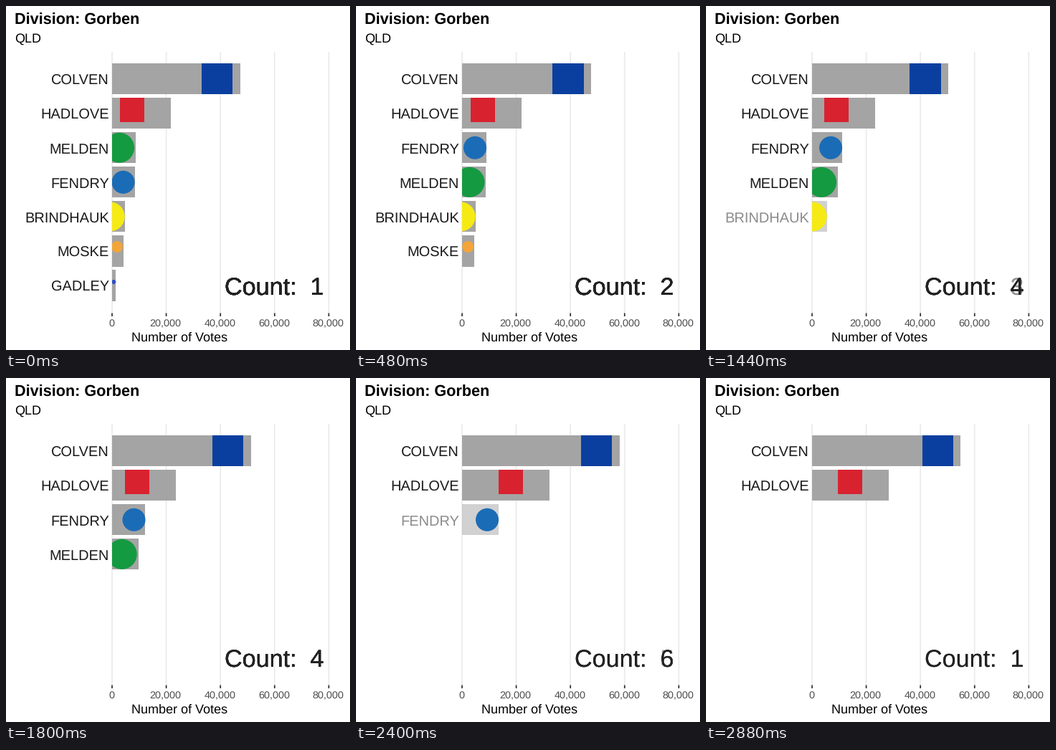
Write a matplotlib script that moves like this. It is 480 px wide and 480 px high and loops after 3 s.

```python
import matplotlib.pyplot as plt
from matplotlib.animation import FuncAnimation
from matplotlib.patches import Circle, Rectangle

plt.rcParams["font.family"] = "Liberation Sans"
plt.rcParams["text.hinting"] = "none"

SIZE = 480
FRAMES, INTERVAL = 25, 120
X0, X_STEP = 148, 75.6          # pixel of zero, pixels per 20,000 votes
ROW_TOP, ROW_STEP, BAR_H = 101.7, 48.05, 43.2
PANEL_TOP, PANEL_BOTTOM = 64, 428.5
GREY = "#a4a4a4"

# Start and end frame of the move out of each count; the last one wraps.
MOVES = [(2, 4), (6, 9), (11, 13), (15, 17), (19, 21), (23, 25)]

# name, rows (first count, later counts), votes per count,
# badge: shape, colour, centre offset from bar end and row, half size
CANDIDATES = [
    ("COLVEN", (0, 0), [47300, 47600, 49260, 51240, 53700, 62450],
     ("square", "#0b3f9f", -32, 0, 21.6)),
    ("HADLOVE", (1, 1), [21800, 22000, 23000, 23600, 29850, 34830],
     ("square", "#d9222f", -54, -4.6, 17)),
    ("MELDEN", (2, 3), [8750, 8850, 9350, 9720],
     ("circle", "#149a40", -23, 0, 21)),
    ("FENDRY", (3, 2), [8350, 9000, 9950, 12300, 13500],
     ("circle", "#1b6cb6", -16, 0, 16)),
    ("BRINDHAUK", (4, 4), [4800, 5050, 5600],
     ("circle", "#f6ea14", -21, 0, 20.5)),
    ("MOSKE", (5, 5), [4200, 4550],
     ("circle", "#f2a53a", -9, -6, 8)),
    ("GADLEY", (6, 6), [1400],
     ("circle", "#2c50c4", -3, -5, 3)),
]


def ease(t):
    """Cubic in and out."""
    return 4 * t ** 3 if t < 0.5 else 1 - 4 * (1 - t) ** 3


def mix(a, b, t):
    return a + (b - a) * t


def phase(n):
    """Current count index and eased progress towards the next one."""
    for k, (start, end) in enumerate(MOVES):
        if n < end:
            return k, ease(max(0, (n - start) / (end - start)))


def vote_x(votes):
    return X0 + votes / 20000 * X_STEP


fig = plt.figure(figsize=(SIZE / 72, SIZE / 72), dpi=72, facecolor="white")
ax = fig.add_axes([0, 0, 1, 1])
ax.set_xlim(0, SIZE)
ax.set_ylim(SIZE, 0)
ax.axis("off")


def text(x, y, s, size, **kw):
    return ax.text(x, y, s, fontsize=size, va="baseline", **kw)


def vline(x, top, bottom, colour):
    ax.plot([x, x], [top, bottom], color=colour, lw=1.75, snap=False,
            solid_capstyle="butt", zorder=1)


def draw_static():
    text(12.5, 26, "Division: Gorben", 21.6, weight="bold", color="black")
    text(12, 51, "QLD", 18, color="black")
    text(242, 468, "Number of Votes", 18, ha="center", color="black")
    for i in range(5):
        x = X0 + i * X_STEP
        vline(x, PANEL_TOP, PANEL_BOTTOM, "#ebebeb")
        vline(x, PANEL_BOTTOM, PANEL_BOTTOM + 4.5, "#333333")
        text(x - 1, 447, f"{i * 20000:,}", 14.4, ha="center",
             color="#4d4d4d")


class Row:
    def __init__(self, name, rows, votes, badge):
        self.rows, self.votes = rows, votes
        self.shape, colour, self.dx, self.dy, self.half = badge
        self.bar = ax.add_patch(Rectangle((X0, 0), 0, BAR_H, fc=GREY, lw=0,
                                          zorder=2))
        if self.shape == "circle":
            self.badge = Circle((0, 0), self.half, fc=colour, lw=0, zorder=3)
        else:
            side = 2 * self.half
            self.badge = Rectangle((0, 0), side, side, fc=colour, lw=0,
                                   zorder=3)
        ax.add_patch(self.badge)
        panel = Rectangle((X0, PANEL_TOP), 320, PANEL_BOTTOM - PANEL_TOP,
                          transform=ax.transData)
        self.badge.set_clip_path(panel)
        self.label = text(144, 0, name, 20, ha="right", color="#1a1a1a",
                          zorder=4)
        # Every row prints the count, so the overlaid edges look heavier.
        self.count = text(305, 404, "", 34.15, color="#222222", zorder=5)
        self.parts = [self.bar, self.badge, self.label, self.count]

    def update(self, k, t):
        shown = k < len(self.votes)
        for part in self.parts:
            part.set_visible(shown)
        if not shown:
            return
        after = (k + 1) % len(MOVES)
        leaving = after >= len(self.votes)
        target = k if leaving else after
        end = vote_x(mix(self.votes[k], self.votes[target], t))
        row = mix(self.rows[min(k, 1)], self.rows[min(target, 1)], t)
        y = ROW_TOP + ROW_STEP * row

        self.bar.set_bounds(X0, y - BAR_H / 2, end - X0, BAR_H)
        self.label.set_y(y + 8)
        number = target if t >= 0.5 else k
        self.count.set_text(f"Count:  {number + 1}")
        for part in (self.bar, self.label, self.count):
            part.set_alpha(1 - t if leaving else 1)

        cx, cy = end + self.dx, y + self.dy
        if self.shape == "circle":
            self.badge.center = (cx, cy)
        else:
            self.badge.set_xy((cx - self.half, cy - self.half))


draw_static()
table = [Row(*c) for c in CANDIDATES]


def update(n):
    k, t = phase(n)
    for row in table:
        row.update(k, t)
    return []


anim = FuncAnimation(fig, update, frames=FRAMES, interval=INTERVAL,
                     repeat=True, repeat_delay=0, blit=False)
plt.show()
```
